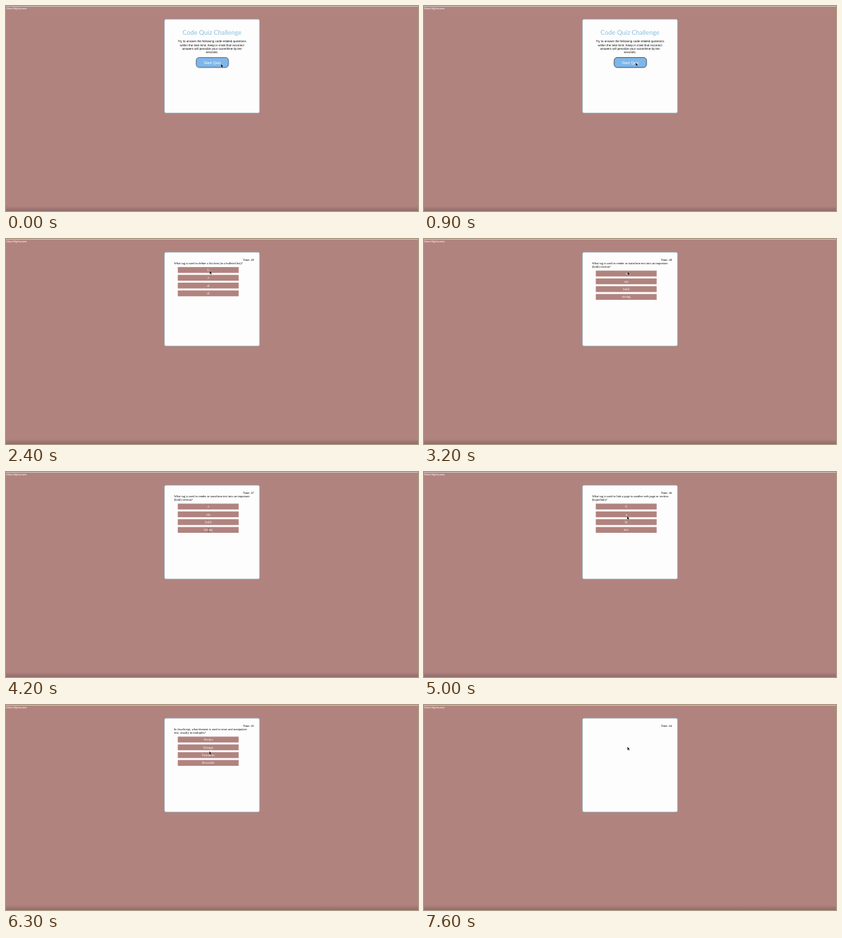
These frames come from a looping animation (600x300 px, 8 s). An HTML page:

```html
<!DOCTYPE html>
<html lang="en">
<head>
<meta charset="utf-8">
<title>Code quiz</title>
<style>
  html, body { margin: 0; width: 100%; height: 100%; overflow: hidden; background: #b1837f; }
  svg { display: block; width: 600px; height: 300px; }
  text { text-rendering: geometricPrecision; }
  .fancy { font-family: Lato, sans-serif; }
  .sans { font-family: "Liberation Sans", Arial, sans-serif; }
  .serif { font-family: "Liberation Serif", "Times New Roman", serif; }
  .mid { text-anchor: middle; }
  .body { font-size: 4.49px; fill: #000; }
  .label { font-size: 5.05px; fill: #fff; }
</style>
</head>
<body>
<svg viewBox="0 0 600 300">
  <defs>
    <linearGradient id="foot" x1="0" y1="0" x2="0" y2="1">
      <stop offset="0" stop-color="#8f6b69" stop-opacity="0"/>
      <stop offset="1" stop-color="#8f6b69"/>
    </linearGradient>
  </defs>
  <rect width="600" height="300" fill="#b1837f"/>
  <rect width="600" height="1" fill="#cdc3c3"/>
  <rect y="293" width="600" height="7" fill="url(#foot)"/>
  <text class="fancy" x="0" y="5" font-size="4.15" fill="#fff">View Highscores</text>
  <rect x="230.7" y="19.2" width="138.6" height="137.6" rx="2.3" fill="#fdfdfd" stroke="#7f9fab" stroke-width=".7"/>

  <g id="intro">
    <text class="fancy mid" x="300" y="41.7" font-size="9.35" fill="#86bfdc">Code Quiz Challenge</text>
    <g id="rules" class="sans body mid"></g>
    <rect x="277" y="75.4" width="47" height="14.6" rx="4.3" fill="#7fb6e8"/>
    <rect id="rim" x="277" y="75.4" width="47" height="14.6" rx="4.3" fill="none" stroke-width=".9"/>
    <text class="sans mid" x="300.5" y="84.7" font-size="5.6" fill="#fff">Start Quiz</text>
  </g>

  <g id="quiz" class="serif"></g>
  <text id="clock" class="serif body" x="361" y="31.9" text-anchor="end"></text>

  <g id="pointer">
    <path id="arrow" d="M0 0V5.2L1.2 4.1L2.1 6.1L3 5.7L2.1 3.8H3.8Z" fill="#000" stroke="#fff" stroke-width=".35"/>
    <path id="beam" d="M-.9 0Q0 0 0 .8Q0 0 .9 0M0 .8V4.6M-.9 5.4Q0 5.4 0 4.6Q0 5.4 .9 5.4" fill="none" stroke="#6b5553" stroke-width=".6"/>
  </g>
</svg>
<script>
const LOOP = 8000, TICK = 100;
const $ = id => document.getElementById(id);

const rules = [
  "Try to answer the following code-related questions",
  "within the time limit. Keep in mind that incorrect",
  "answers will penalize your score/time by ten",
  "seconds."
];

const questions = [
  { at: 1100, lines: ["What tag is used to define a list item (in a bulleted list)?"],
    answers: ["li", "a", "ul", "ol"] },
  { at: 2700, lines: ["What tag is used to render or transform text into an important", "(bold) version?"],
    answers: ["a", "em", "bold", "strong"] },
  { at: 4300, lines: ["What tag is used to link a page to another web page or section", "(hyperlink)?"],
    answers: ["li", "a", "br", "nav"] },
  { at: 5400, lines: ["What tag is used to define a standard cell inside a table?"],
    answers: ["hr", "h1", "td", "footer"] },
  { at: 6300, lines: ["In JavaScript, what element is used to store and manipulate", "text, usually in multiples?"],
    answers: ["Arrays", "Strings", "Variables", "Recorder"] },
  { at: 7600, lines: [], answers: [] }
];

// Pointer moves: first step, last step, end x, end y
const home = [313, 84.8];
const moves = [
  [100, 300, 307.8, 81.5],
  [500, 500, 308.2, 82.7],
  [1600, 2100, 296.3, 46.3],
  [2400, 2400, 296.5, 46.5],
  [3200, 4000, 295, 82.4],
  [4700, 5100, 295.8, 62.5],
  [5800, 5900, 296, 67.6],
  [6800, 7100, 296.2, 61]
];

// Moments at which the clock shows 49, 48, ...
const seconds = [2000, 3000, 4000, 5000, 6100, 7000];

const line = (s, x, y, cls = "") => `<text x="${x}" y="${y}" class="${cls}">${s}</text>`;

function drawQuestion({ lines, answers }) {
  const top = 35.9 + 5.2 * lines.length;
  const prompt = lines.map((s, i) => line(s, 244.8, 37.1 + 5.2 * i, "body"));
  const buttons = answers.map((s, i) => {
    const y = top + 11.4 * i;
    return `<rect x="250.2" y="${y}" width="88.6" height="8.5" fill="#b1837f"/>` +
      line(s, 294.5, y + 5.8, "label mid");
  });
  return [...prompt, ...buttons].join("");
}

function pointerAt(t) {
  let [x, y] = home;
  for (const [from, to, nx, ny] of moves) {
    if (t < from) break;
    const p = Math.min(1, (t - from + TICK) / (to - from + TICK));
    const e = p * p * (3 - 2 * p);
    x += (nx - x) * e;
    y += (ny - y) * e;
  }
  return [x, y];
}

const show = (id, on) => $(id).setAttribute("display", on ? "inline" : "none");

$("rules").innerHTML = rules.map((s, i) => line(s, 300, 53.4 + 5.16 * i)).join("");
$("quiz").innerHTML = questions.map((q, i) => `<g id="q${i}">${drawQuestion(q)}</g>`).join("");

function render(t) {
  const current = questions.filter(q => t >= q.at).length - 1;
  show("intro", current < 0);
  questions.forEach((q, i) => show("q" + i, i === current));
  $("rim").setAttribute("stroke", t < 900 ? "#46596d" : "#303d4c");

  const ticks = seconds.filter(s => t >= s).length;
  $("clock").textContent = ticks ? `Time: ${50 - ticks}` : "";

  const onText = t >= 4200 && t < 4700;
  show("arrow", !onText);
  show("beam", onText);
  $("pointer").setAttribute("transform", `translate(${pointerAt(t)})`);
}

const start = performance.now();
function frame() {
  const t = (performance.now() - start) % LOOP;
  render(Math.floor(t / TICK) * TICK);
  requestAnimationFrame(frame);
}
frame();
</script>
</body>
</html>
```
